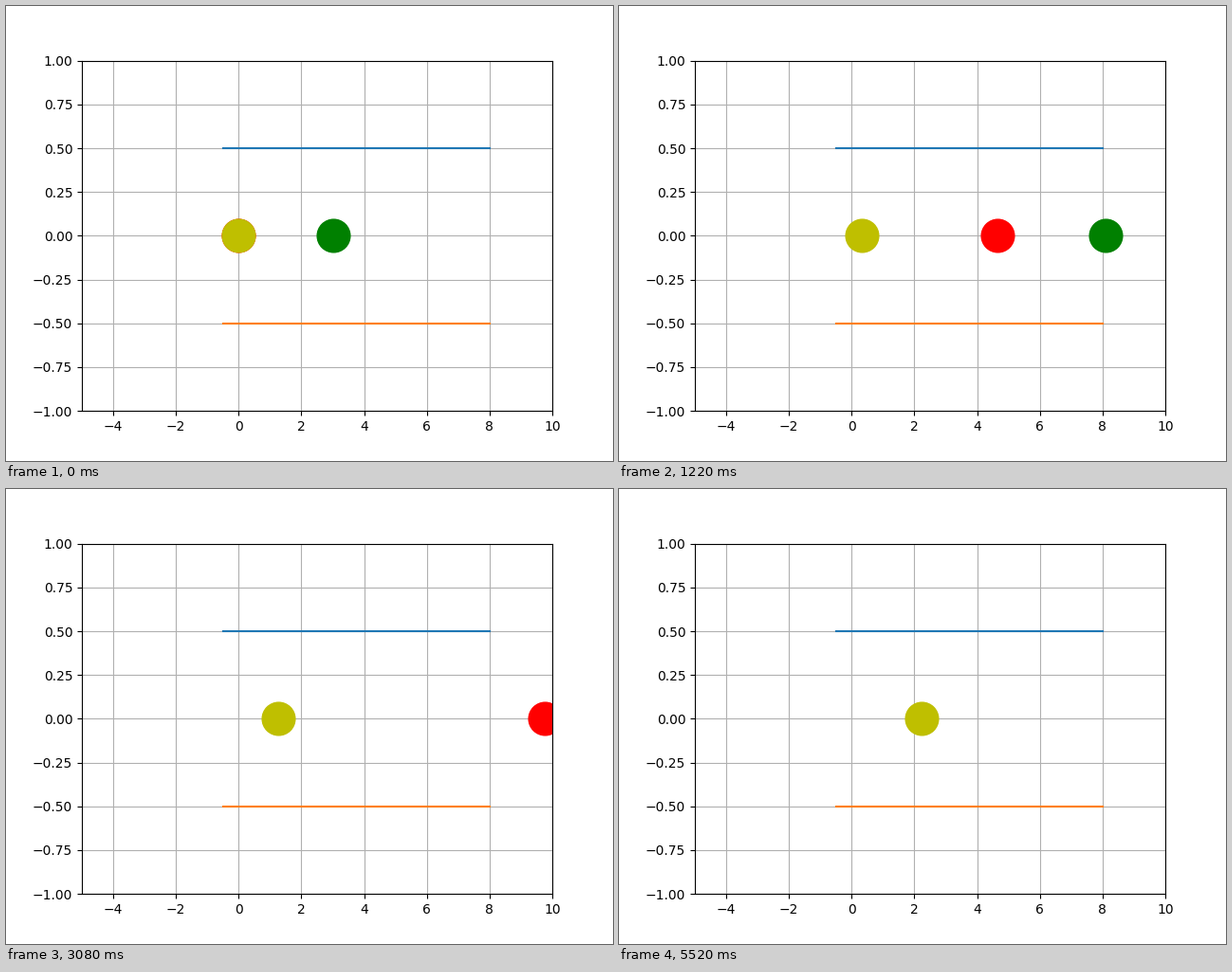
These frames come from a looping animation (640 px wide and 480 px high, 5.54 s). A matplotlib script:

```python
import matplotlib.pyplot as plt
from matplotlib.animation import FuncAnimation

TICKS = 277
INTERVAL = 20
DT = 25 / 249        # 250 simulation steps over 25 s
CONTACT = 0.5        # centre distance at which the balls collide
SLOW_FROM = 168      # both fast balls have left; the clock turns coarse

HEAVY, LIGHT = 3, 1
V_RED, V_GREEN, V_YELLOW = 1.0, 0.1, 0.1
GREEN_START = 3.0


def elastic(m1, v1, m2, v2):
    """Velocities of two bodies after a head-on elastic collision."""
    centre = (m1 * v1 + m2 * v2) / (m1 + m2)
    return 2 * centre - v1, 2 * centre - v2


# First step at which red and green touch
hit = 0
while GREEN_START + (V_GREEN - V_RED) * hit * DT > CONTACT:
    hit += 1
RED_AFTER, GREEN_AFTER = elastic(HEAVY, V_RED, LIGHT, V_GREEN)


def step_at(tick):
    if tick <= SLOW_FROM:
        return tick
    return SLOW_FROM + 3 * ((tick - SLOW_FROM) // 4)


def travel(start, before, after, step):
    early = min(step, hit)
    return start + DT * (before * early + after * (step - early))


fig, ax = plt.subplots(figsize=(6.4, 4.8), dpi=100)
ax.set_xlim(-5, 10)
ax.set_ylim(-1, 1)
ax.grid()
for y in (0.5, -0.5):
    ax.plot([-0.5, 8], [y, y])


def ball(color):
    return ax.plot([0], [0], "o", color=color, markersize=25)[0]


red, green, yellow = ball("r"), ball("g"), ball("y")


def update(tick):
    step = step_at(tick)
    red.set_data([travel(0, V_RED, RED_AFTER, step)], [0])
    green.set_data([travel(GREEN_START, V_GREEN, GREEN_AFTER, step)], [0])
    yellow.set_data([travel(0, 0, V_YELLOW, step)], [0])
    return red, green, yellow


anim = FuncAnimation(fig, update, frames=TICKS, interval=INTERVAL,
                     repeat=True, repeat_delay=0)
plt.show()
```
